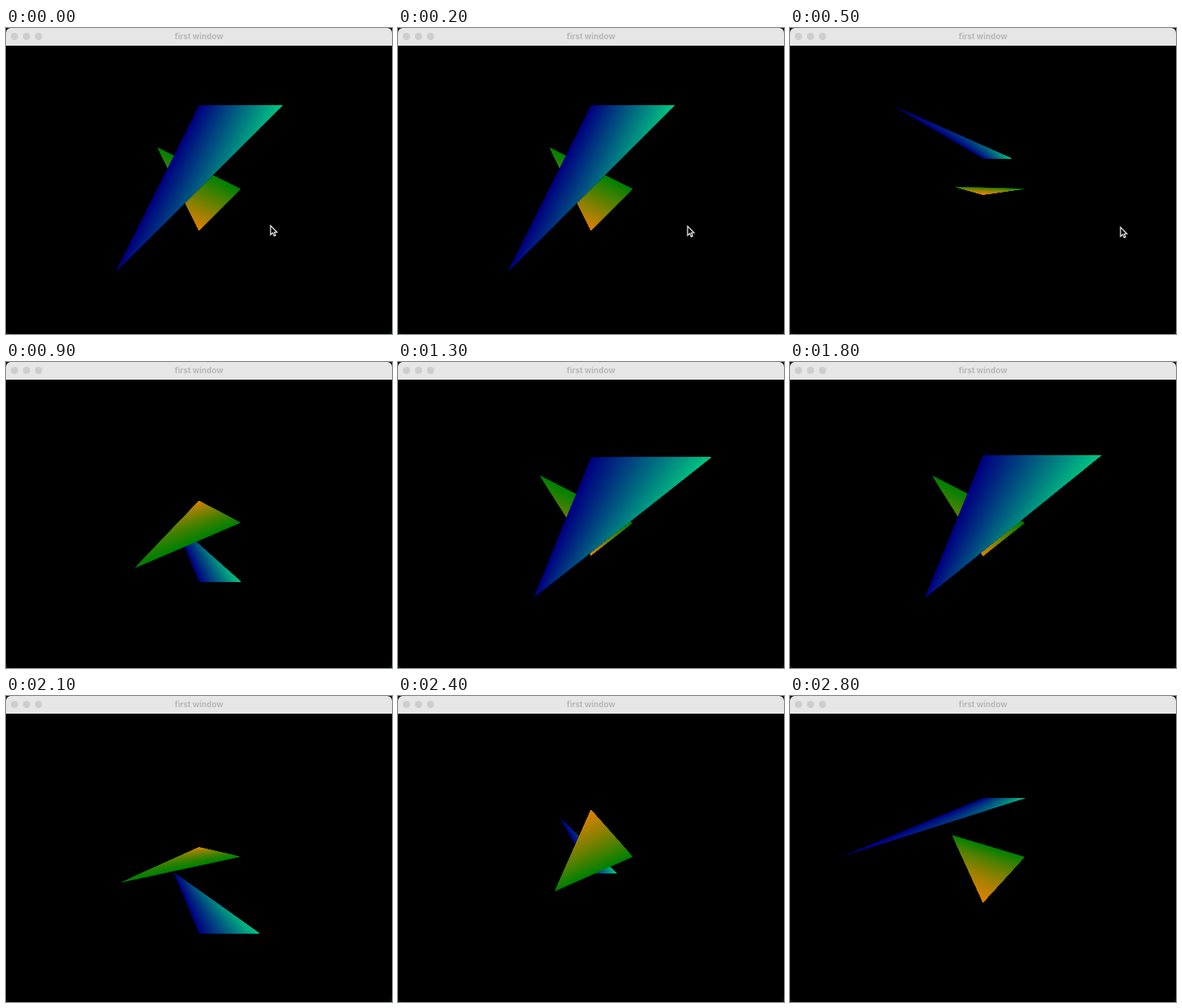
An HTML page with a canvas for the animation above (2900 ms loop, 480 px wide and 381 px high).

```html
<!DOCTYPE html>
<html lang="en">
<head>
<meta charset="utf-8">
<title>first window</title>
<style>
  html, body { margin: 0; width: 100%; height: 100%; overflow: hidden; background: #08161e; }
  .window { position: relative; width: 480px; height: 381px; overflow: hidden; border-radius: 6px; background: #000; }
  .bar { position: absolute; width: 480px; height: 22px; background: #e6e6e7; color: #b8b8b8;
         font: 700 10px/21px Inter, sans-serif; text-align: center; }
  .bar i { position: absolute; top: 6px; width: 9px; height: 9px; border-radius: 50%; background: #cdcdcd; }
  canvas { position: absolute; left: 0; top: 0; }
</style>
</head>
<body>
<div class="window">
  <canvas width="480" height="381"></canvas>
  <div class="bar"><i style="left:6px"></i><i style="left:21px"></i><i style="left:36px"></i>first window</div>
</div>
<script>
const ctx = document.querySelector('canvas').getContext('2d');
const LOOP = 2900, STEP = 100, SHADES = 48;

// [ms, degrees]: spin forward, pause, spin back
const SPIN = [[0, 0], [210, 0], [500, 86], [900, 225], [1450, 380], [1660, 380], [LOOP, 15.6]];

// The last vertex carries the accent colour, the other two the base colour.
const GREEN = { points: [[1, 0, 0], [-1, -1, 0], [0, 1, 0]], base: [0, 128, 0], accent: [226, 128, 0] };
const BLUE = { points: [[0, -1, 1], [-1, 1, 1], [1, -1, 1]], base: [0, 0, 128], accent: [0, 200, 128] };

const mix = (a, b, k) => a.map((v, i) => v + (b[i] - v) * k);

function spinAt(t) {
  const next = SPIN.findIndex(key => key[0] > t);
  const [t0, a0] = SPIN[next - 1], [t1, a1] = SPIN[next];
  return (a0 + (a1 - a0) * (t - t0) / (t1 - t0)) * Math.PI / 180;
}

// Rotate about the x axis, then project with the camera two units away.
function project([x, y, z], angle) {
  const c = Math.cos(angle), s = Math.sin(angle);
  const scale = 103.6 / (2 - (y * s + z * c));
  return [240 + x * scale, 200.2 + (y * c - z * s) * scale];
}

function fillPath(points, color) {
  ctx.beginPath();
  points.forEach(p => ctx.lineTo(...p));
  ctx.closePath();
  ctx.fillStyle = color;
  ctx.fill();
}

// Shade by overpainting ever smaller triangles towards the tip.
function drawTriangle({ points: [a, b, tip], base, accent }, angle) {
  for (let i = 0; i < SHADES; i++) {
    const k = i / SHADES;
    const shape = [mix(a, tip, k), mix(b, tip, k), tip];
    fillPath(shape.map(p => project(p, angle)), `rgb(${mix(base, accent, k).map(Math.round)})`);
  }
}

function drawPointer(x, y) {
  const arrow = [[0, 0], [0, 11.5], [2.6, 9], [4.5, 13], [6.3, 12.2], [4.6, 8.4], [8, 8.2]];
  fillPath(arrow.map(([dx, dy]) => [x + dx, y + dy]), '#000');
  ctx.strokeStyle = '#e0e8e8';
  ctx.lineWidth = 1.3;
  ctx.stroke();
}

function draw(now) {
  const t = Math.floor(now % LOOP / STEP) * STEP;
  const angle = spinAt(t);
  const order = Math.cos(angle) > 0 ? [GREEN, BLUE] : [BLUE, GREEN];
  ctx.clearRect(0, 0, 480, 381);
  order.forEach(triangle => drawTriangle(triangle, angle));
  drawPointer(329 + 0.15 * t + 0.000028 * t * t, 246 + 0.004 * t);
  requestAnimationFrame(draw);
}
requestAnimationFrame(draw);
</script>
</body>
</html>
```
